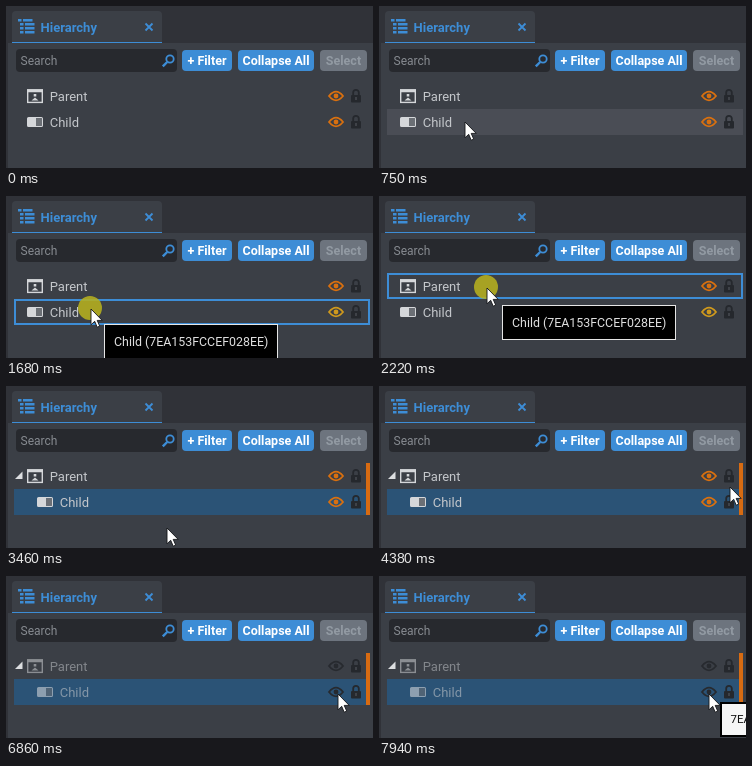
Write an HTML page that moves like this. It is 367x162 px and loops after 8000 ms.

```html
<!DOCTYPE html>
<html lang="en">
<head>
<meta charset="utf-8">
<title>Hierarchy panel</title>
<style>
  html, body { margin: 0; width: 100%; height: 100%; overflow: hidden; background: #303238; }
  svg { display: block; width: 367px; height: 162px; font: 12.5px Roboto, sans-serif; }
  .bold { font-weight: 700; }
  .name { font-size: 13px; fill: #c4c7cb; }
  .blue { fill: #3d8dd6; }
  .line { fill: none; stroke-width: 1.8; }
</style>
</head>
<body>
<svg viewBox="0 0 367 162">
  <defs>
    <g id="eyeShape">
      <path class="line" stroke="currentColor" d="M-7 0Q0-8.6 7 0Q0 8.6-7 0Z"/>
      <circle r="2.4" fill="currentColor"/>
    </g>
    <g id="lockShape">
      <path class="line" stroke="#25282d" d="M-2.8 0V-3.4a2.8 2.8 0 0 1 5.6 0V0"/>
      <rect x="-5" y="-1" width="10" height="7.5" rx="1" fill="#25282d"/>
      <rect x="-.7" y="1" width="1.4" height="3" fill="#4a4e55"/>
    </g>
    <path id="bulletLine" d="M0 0h3.5v2.6H0zM5 0h9.5v2.6H5z"/>
  </defs>

  <rect width="367" height="162" fill="#303238"/>
  <rect x="2" y="37" width="365" height="125" fill="#3b3f46"/>
  <path d="M6 37V9a4 4 0 0 1 4-4H152a4 4 0 0 1 4 4V37Z" fill="#3b3f46"/>
  <rect class="blue" x="6" y="36" width="150" height="1"/>
  <g class="blue">
    <use href="#bulletLine" x="12" y="13"/>
    <use href="#bulletLine" x="14" y="17"/>
    <use href="#bulletLine" x="14" y="21"/>
    <use href="#bulletLine" x="14" y="25"/>
  </g>
  <text class="bold blue" x="34.5" y="26" font-size="13">Hierarchy</text>
  <path d="M139.5 17.5l7 7m0-7l-7 7" stroke="#3d8dd6" stroke-width="1.8"/>

  <rect x="10" y="43" width="161" height="23" rx="4" fill="#27292e"/>
  <text x="14.5" y="59" font-size="12" fill="#878b91">Search</text>
  <g class="line" stroke="#3d8dd6">
    <circle cx="164" cy="53" r="3.7"/>
    <path d="M161.2 56l-4.4 4.4" stroke-width="2.4"/>
  </g>
  <g class="bold" text-anchor="middle" fill="#fff">
    <rect class="blue" x="176" y="44" width="50" height="21" rx="4"/>
    <text x="201" y="59">+ Filter</text>
    <rect class="blue" x="232" y="44" width="76" height="21" rx="4"/>
    <text x="270" y="59">Collapse All</text>
    <rect x="314" y="44" width="47" height="21" rx="4" fill="#6d747e"/>
    <text x="337.5" y="59" fill="#929aa3">Select</text>
  </g>

  <rect id="rowFill" x="8" y="103" width="356" height="26"/>
  <g id="nested">
    <path d="M16.5 85.5V93H9Z" fill="#dcdee0"/>
    <rect x="360" y="77" width="4" height="52" fill="#d76b12"/>
  </g>
  <g id="parent">
    <rect x="21.7" y="84" width="14.6" height="12.4" fill="none" stroke="#d5d7da" stroke-width="1.4"/>
    <path fill="#d5d7da" d="M21 83.3h16v3H21zM27.7 88h2.6v2.4h-2.6zM25.5 94.6l3.5-3.2 3.5 3.2z"/>
    <text class="name" x="43.7" y="95">Parent</text>
  </g>
  <g id="child">
    <rect x="21.6" y="111.6" width="14.8" height="8.8" rx="1" fill="none" stroke="#d5d7da" stroke-width="1.2"/>
    <rect x="22" y="112" width="8" height="8" fill="#d5d7da"/>
    <rect x="30" y="112.2" width="6" height="7.6" fill="#6b6f75"/>
    <text class="name" x="43.7" y="121">Child</text>
  </g>
  <use id="parentEye" href="#eyeShape" x="330" y="90"/>
  <use id="childEye" href="#eyeShape" x="330" y="116"/>
  <use href="#lockShape" x="350" y="90"/>
  <use href="#lockShape" x="350" y="116"/>
  <rect id="dropFrame" x="9" width="354" height="24" fill="none" stroke="#3d8dd6" stroke-width="2"/>

  <circle id="press" r="12" fill="#b6b01f" fill-opacity=".88"/>
  <g id="dragTip">
    <rect x=".5" y=".5" width="173" height="34" fill="#000" stroke="#e6e6e6"/>
    <text x="10" y="22" font-size="12.4" fill="#dedede">Child (7EA153FCCEF028EE)</text>
  </g>
  <g id="hoverTip">
    <rect x="1" y="1" width="153" height="33" fill="#f6f6f6" stroke="#000" stroke-width="2"/>
    <text x="10.5" y="21" font-size="11.5" fill="#111">7EA153FCCEF028EE</text>
  </g>
  <path id="cursor" d="M0 0V15.8L3.7 12.3 6.2 18.2 8.7 17.1 6.2 11.4H11.2Z" fill="#fff" stroke="#15171a" stroke-width=".9"/>
</svg>

<script>
const LOOP = 8000, ENTER = 130, STEP = 77.3;
const PICK = 1300, DRAG = 1450, DROP = 2830, HIDE = 4930, LEAVE = 5240, RETURN = 6400;
const ORANGE = '#d9700f', AMBER = '#cf991d', DARK = '#272a2f';
const $ = id => document.getElementById(id);

const outside = [370, 165], eye = [333, 86], lowerEye = [330, 115];
// Each move follows a curve from where the last one ended, bent towards "via".
const moves = [
  { start: ENTER, end: 980, via: [105, 113], to: [63, 112] },
  { start: DRAG, end: 2220, via: [106, 119], to: [108, 92] },
  { start: 3230, end: 4000, via: [189, 203], to: [343, 140] },
  { start: 4000, end: 4530, via: [375, 112], to: eye },
  { start: 5000, end: LEAVE, via: eye, to: outside },
  { start: 6320, end: 7010, via: lowerEye, to: lowerEye },
  { start: 7400, end: 7710, via: lowerEye, to: [330, 118] }
];

const between = (t, a, b) => t >= a && t < b;
const clamp = v => Math.max(0, Math.min(1, v));

function pointerAt(t) {
  let p = [150, 162];
  for (const { start, end, via, to } of moves) {
    const k = clamp((t - start) / (end - start)), r = 1 - k;
    p = p.map((v, i) => r * r * v + 2 * r * k * via[i] + k * k * to[i]);
  }
  return p;
}
function show(id, on) { $(id).style.display = on ? '' : 'none'; }
function place(id, [x, y], dx = 0, dy = dx) {
  $(id).setAttribute('transform', `translate(${Math.round(x + dx)} ${Math.round(y + dy)})`);
}

function render(t) {
  // The pointer moves in steps, about 13 times a second.
  const tick = ENTER + Math.floor((t - ENTER) / STEP + 0.08) * STEP;
  const pointer = pointerAt(tick);
  const overParent = pointer[1] < 103, overRows = pointer[1] < 129;
  const dragging = between(t, DRAG, DROP), dropped = t >= DROP, hidden = t >= HIDE;

  show('cursor', between(t, ENTER, LEAVE) || t >= RETURN);
  place('cursor', pointer);
  show('press', between(t, PICK, DROP) || between(t, 4850, HIDE) || between(t, 7180, 7330));
  place('press', pointer, -1);

  show('rowFill', dropped || between(t, ENTER, DRAG) && overRows);
  $('rowFill').setAttribute('fill', dropped ? '#2b5376' : '#4a4d55');
  show('dropFrame', dragging);
  $('dropFrame').setAttribute('y', overParent ? 78 : 104);
  show('dragTip', dragging);
  place('dragTip', pointerAt(tick - 25), 15);

  const firstTip = between(t, 980, DRAG);
  show('hoverTip', firstTip || t >= 7780);
  $('hoverTip').style.opacity = clamp((tick - (firstTip ? 900 : 7705)) / 230);
  place('hoverTip', pointer, 11, 8);

  show('nested', dropped);
  place('child', [dropped ? 10 : 0, 0]);
  $('parent').style.opacity = hidden ? 0.52 : 1;
  $('child').style.opacity = hidden ? 0.58 : 1;
  $('parentEye').style.color = hidden ? DARK : ORANGE;
  $('childEye').style.color = hidden ? DARK : dragging ? AMBER : ORANGE;
  $('childEye').style.opacity = between(t, HIDE, 6860) ? 0.3 : 1;
}

function frame() {
  render(performance.now() % LOOP);
  requestAnimationFrame(frame);
}
frame();
</script>
</body>
</html>
```
